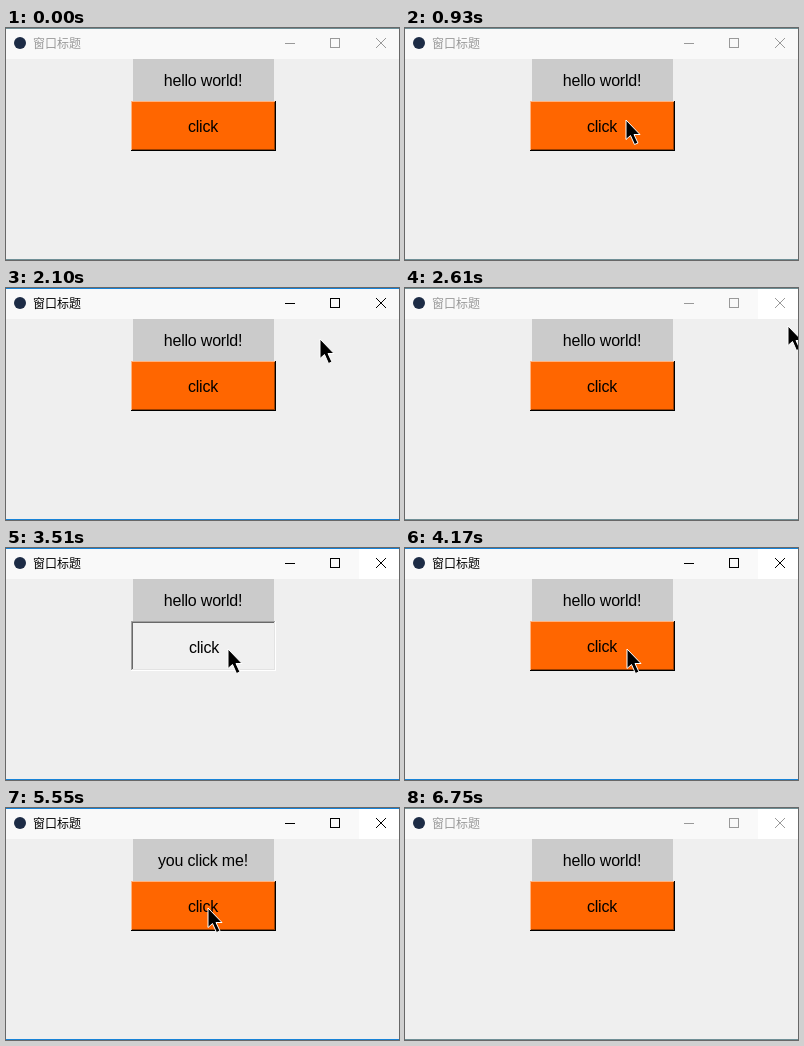
Write an HTML page that moves like this. It is 393 by 232 pixels and loops after 6.84 s.

```html
<!DOCTYPE html>
<html lang="zh">
<head>
<meta charset="utf-8">
<style>
html, body { margin: 0; width: 100%; height: 100%; overflow: hidden; background: #efefef; }
svg { display: block; width: 393px; height: 232px; }
.title { font: 12px "Noto Sans CJK SC", "Noto Sans CJK", sans-serif; }
.ui { font: 16px "Liberation Sans", Arial, sans-serif; letter-spacing: -0.2px; text-anchor: middle; }
.crisp { shape-rendering: crispEdges; }
</style>
</head>
<body>
<svg viewBox="0 0 393 232">
  <rect width="393" height="31" fill="#f9f9f9"/>
  <rect id="hot" x="353" y="1" width="40" height="30"/>
  <path id="frame" class="crisp" d="M0 .5H393M0 231.5H393"/>
  <circle cx="14" cy="15" r="6" fill="#1c2b45"/>
  <text id="title" class="title" x="27" y="20">窗口标题</text>
  <g id="controls" fill="none">
    <path class="crisp" d="M279 15.5h10M324.5 10.5h9v9h-9z"/>
    <path id="close" d="M370 10l10 10M380 10l-10 10"/>
  </g>

  <rect x="127" y="31" width="141" height="42" fill="#cbcbcb"/>
  <text id="label" class="ui" x="197" y="58"></text>

  <g id="button" class="crisp" fill="none">
    <rect x="125" y="73" width="145" height="50"/>
    <path d="M125.5 122V73.5H269"/>
    <path d="M126.5 121V74.5H268"/>
    <path d="M126 121.5H268.5V74"/>
    <path d="M125 122.5H269.5V73"/>
  </g>
  <text id="click" class="ui">click</text>

  <path id="cursor" d="M0 0V19.5L4.5 15.5L8.5 24.5L12 23L8 14.5H14Z" stroke="#fff"/>
</svg>
<script>
const LOOP = 6840, STEP = 30, FADE = 90;
const HOLD_FIRST = 120, HOLD_SECOND = 90;

// Each visit: the pointer enters, clicks twice on one spot, leaves, and the window loses focus.
const visits = [
  { enter: 660, arrive: 900, first: 990, second: 1680, leave: 1860, gone: 2190, blur: 2430,
    from: [385, 112], spot: [221, 92], to: [396, 14] },
  { enter: 2610, arrive: 3000, first: 3510, second: 4080, leave: 4230, gone: 4380, blur: 4710,
    from: [383, 38], spot: [222, 101], to: [396, 130] },
  { enter: 4890, arrive: 5250, first: 5430, second: 5940, leave: 6180, gone: 6480, blur: 6750,
    from: [385, 104], spot: [202, 100], to: [396, 142] }
];

// face, then bevel lines: outer and inner top-left, inner and outer bottom-right
const RAISED = ["#ff6600", "#ffb27f", "#ff6600", "#993d00", "#000"];
const SUNKEN = ["#f0f0f0", "#a0a0a0", "#696969", "#e3e3e3", "#fff"];

const $ = id => document.getElementById(id);
const set = (el, attrs) => {
  for (const k in attrs) el.setAttribute(k, attrs[k]);
};
const span = (t, a, b) => Math.min(1, Math.max(0, (t - a) / (b - a)));
const within = (t, a, b) => t >= a && t < b;
const lerp = (a, b, k) => a.map((v, i) => Math.round(v + (b[i] - v) * k));

function pointer(t, v) {
  if (t < v.leave) return lerp(v.from, v.spot, 1 - (1 - span(t, v.enter, v.arrive)) ** 4);
  return lerp(v.spot, v.to, span(t, v.leave, v.gone) ** 2);
}

function draw(t) {
  const v = visits.find(v => t < v.blur) || visits[2];
  const on = within(t, v.first, v.blur);
  const down = within(t, v.first, v.first + HOLD_FIRST) || within(t, v.second, v.second + HOLD_SECOND);
  const clicked = within(t, v.first + HOLD_FIRST, v.second + HOLD_SECOND);
  const shown = within(t, v.enter, v.gone);
  const [x, y] = pointer(t, v);
  const over = shown && x >= 353 && y < 31;
  const ink = on ? "#000" : "#999";

  set($("frame"), { stroke: on ? "#1883d7" : "#6f8f96" });
  set($("title"), { fill: ink });
  set($("controls"), { stroke: ink });
  set($("close"), { stroke: over && on ? "#fff" : ink });

  // the close button turns red under the pointer, then fades and stays white
  const { gone } = visits[0];
  const red = lerp([232, 17, 35], [255, 255, 255], span(t, gone, gone + FADE));
  set($("hot"), { fill: t >= gone || over ? `rgb(${red})` : "none" });

  const [face, ...lines] = down ? SUNKEN : RAISED;
  const [box, ...bevel] = $("button").children;
  set(box, { fill: face });
  bevel.forEach((el, i) => set(el, { stroke: lines[i] }));
  set($("click"), { x: 197 + down, y: 104 + down });
  $("label").textContent = clicked ? "you click me!" : "hello world!";
  set($("cursor"), { transform: `translate(${x} ${y})`, visibility: shown ? "visible" : "hidden" });
}

const start = performance.now();
function tick() {
  const t = (performance.now() - start) % LOOP;
  draw(Math.floor(t / STEP) * STEP);
  requestAnimationFrame(tick);
}
tick();
</script>
</body>
</html>
```
